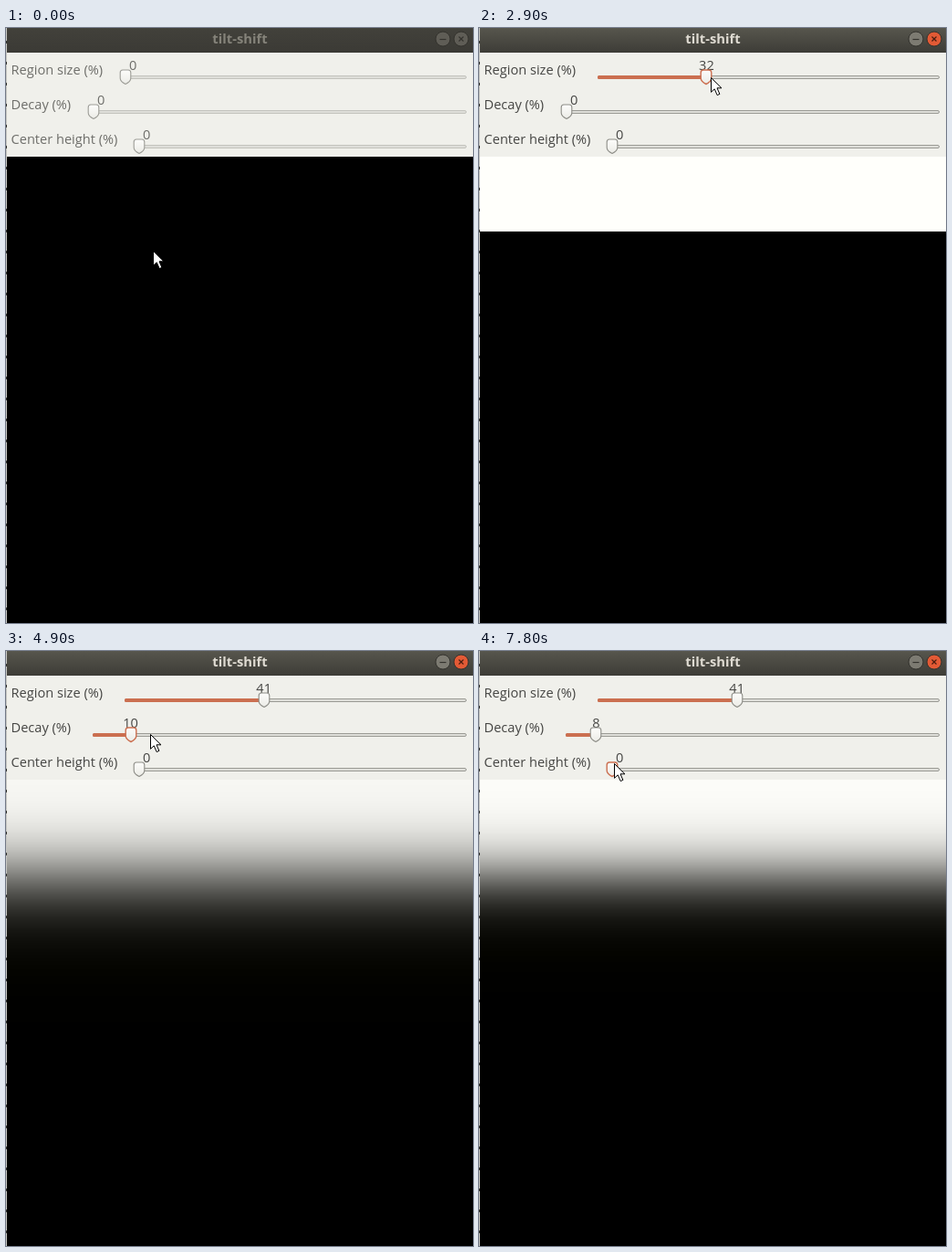
Recreate the animation shown at these times as an HTML page. Size 512 by 652 pixels, loop 8000 ms.

```html
<!DOCTYPE html>
<html lang="en">
<head>
<meta charset="utf-8">
<title>tilt-shift</title>
<style>
  html, body { margin: 0; width: 100%; height: 100%; overflow: hidden; background: #000; }
  svg { display: block; }
  text { font: 14.6px "Open Sans", "Noto Sans", sans-serif; }
  .title { font-weight: 700; font-size: 14.8px; text-anchor: middle; }
  .value { text-anchor: middle; }
</style>
</head>
<body>
<svg id="stage" width="512" height="652" viewBox="0 0 512 652">
  <defs>
    <linearGradient id="bar" x2="0" y2="1">
      <stop offset="0" stop-color="#57564d"/>
      <stop offset="1" stop-color="#3d3c37"/>
    </linearGradient>
    <linearGradient id="barIdle" x2="0" y2="1">
      <stop offset="0" stop-color="#42413b"/>
      <stop offset="1" stop-color="#3b3a35"/>
    </linearGradient>
    <linearGradient id="knob" x2="0" y2="1">
      <stop offset="0" stop-color="#fdfdfb"/>
      <stop offset="1" stop-color="#ebebe6"/>
    </linearGradient>
  </defs>
</svg>
<script>
const LOOP = 8000, STEP = 100;
const IMAGE_TOP = 141, IMAGE_SIZE = 512, TRACK_END = 501;
const FOCUS_TIME = 1700;
const ORANGE = '#cb6f50';

// Each key is [time, ...values]; values run linearly between keys.
const cursorKeys = [
  [0, 161, 244], [500, 161, 244], [700, 154, 146], [800, 154, 146],
  [1100, 138, 91], [1400, 131, 54], [2000, 131, 54], [2300, 177, 54],
  [2900, 254, 54], [3200, 283, 54], [3500, 283, 54], [3900, 104, 87],
  [4000, 104, 87], [4100, 102, 86], [4200, 98, 89], [4600, 98, 89],
  [4700, 115, 90], [4900, 158, 91], [5100, 196, 91], [5200, 197, 91],
  [5400, 197, 91], [6300, 152, 91], [6400, 141, 91], [6500, 141, 91],
  [6700, 130, 91], [6800, 130, 91], [7000, 136, 91], [7300, 136, 91],
  [7600, 148, 123]
];
const regionKeys = [[2000, 0], [2300, 11], [2900, 32], [3200, 41]];
const decayKeys = [
  [4600, 0], [4700, 1], [4800, 5], [4900, 10], [5100, 22], [5200, 25],
  [5400, 25], [6300, 12], [6400, 11], [6500, 11], [6700, 8]
];

const svg = document.getElementById('stage');

function add(tag, attrs, parent = svg, text) {
  const el = document.createElementNS('http://www.w3.org/2000/svg', tag);
  set(el, attrs);
  if (text !== undefined) el.textContent = text;
  parent.appendChild(el);
  return el;
}

function set(el, attrs) {
  for (const name in attrs) el.setAttribute(name, attrs[name]);
}

function sample(keys, t) {
  const next = keys.findIndex(k => k[0] > t);
  if (next === 0) return keys[0].slice(1);
  if (next < 0) return keys[keys.length - 1].slice(1);
  const a = keys[next - 1], b = keys[next];
  const p = (t - a[0]) / (b[0] - a[0]);
  return a.slice(1).map((v, i) => v + (b[i + 1] - v) * p);
}

// Window frame
add('rect', { width: 512, height: 652, fill: '#000' });
add('rect', { width: 1, height: 652, fill: '#c6c6c2' });
for (let y = 14; y < 652; y += 23) add('rect', { y, width: 1, height: 3, fill: '#33332f' });
const titleBar = add('rect', { x: 1, width: 511, height: 27 });
add('rect', { x: 1, y: 27, width: 511, height: 114, fill: '#f0f0eb' });
const title = add('text', { class: 'title', x: 256.5, y: 17 }, svg, 'tilt-shift');

function makeButton(x, mark) {
  return {
    disc: add('circle', { cx: x, cy: 12, r: 8, stroke: '#33322d' }),
    mark: add('path', { d: mark, fill: 'none', 'stroke-width': 1.2 })
  };
}
const minButton = makeButton(479, 'M475.5 12.5h7');
const closeButton = makeButton(499, 'M496.5 9.5l5 5m0-5l-5 5');

// Picture rows
const rowGroup = add('g', { 'shape-rendering': 'crispEdges' });
const rows = Array.from({ length: 652 - IMAGE_TOP }, (_, i) =>
  add('rect', { x: 1, y: IMAGE_TOP + i, width: 511, height: 1 }, rowGroup));

function brightness(y, region, decay) {
  const half = region / 200 * IMAGE_SIZE;
  const d = decay / 100 * IMAGE_SIZE;
  if (!d) return half > 0 && y <= half ? 1 : 0;
  return (Math.tanh((y + half) / d) - Math.tanh((y - half) / d)) / 2;
}

let lastPicture = '';
function drawPicture(region, decay) {
  const key = region + '/' + decay;
  if (key === lastPicture) return;
  lastPicture = key;
  rows.forEach((row, y) => {
    const v = Math.round(255 * brightness(y, region, decay));
    row.setAttribute('fill', `rgb(${v},${v},${Math.max(0, v - 4)})`);
  });
}

// Sliders
function makeSlider(name, start, y) {
  const label = add('text', { x: 5.5, y: y - 2.5 }, svg, name);
  const track = add('rect', {
    x: start - 0.5, y: y - 1, width: 505 - start, height: 3, rx: 1.5, fill: '#deded9'
  });
  const fill = add('rect', { x: start - 1, y: y - 1.5, height: 4, rx: 1.5, fill: ORANGE });
  const value = add('text', { class: 'value', y: y - 7.5 });
  const knob = add('path', {
    d: 'M-3-7.5H3Q5.8-7.5 5.8-4.5V1.5C5.8 4.5 3 6.5 0 8C-3 6.5-5.8 4.5-5.8 1.5V-4.5Q-5.8-7.5-3-7.5Z',
    fill: 'url(#knob)'
  });
  return (amount, active, focused) => {
    const x = start + (TRACK_END - start) * amount / 100;
    const ink = focused ? '#454543' : '#6e6e6a';
    const digits = String(amount);
    label.setAttribute('fill', ink);
    track.setAttribute('stroke', focused ? '#9b9b95' : '#c3c3bd');
    fill.setAttribute('width', amount ? x - start + 1 : 0);
    set(value, { x: Math.max(x, start + 4 + digits.length * 4.2), fill: ink });
    value.textContent = digits;
    set(knob, {
      transform: `translate(${Math.round(x)} ${y})`,
      stroke: active ? ORANGE : focused ? '#8d8d87' : '#9d9d97',
      'stroke-width': active ? 1.4 : 1.1
    });
  };
}
const drawRegion = makeSlider('Region size (%)', 131, 53.5);
const drawDecay = makeSlider('Decay (%)', 96, 91.5);
const drawCenter = makeSlider('Center height (%)', 146, 129.5);

const cursor = add('path', {
  d: 'M.5.5V16.3L4.2 12.8 7.2 19.6 9.9 18.4 7 11.8H12Z',
  fill: '#fff', stroke: '#000', 'stroke-linejoin': 'round'
});

function drawFrame(focused) {
  titleBar.setAttribute('fill', focused ? 'url(#bar)' : 'url(#barIdle)');
  title.setAttribute('fill', focused ? '#dfdbd2' : '#85837a');
  minButton.disc.setAttribute('fill', focused ? '#7d7b72' : '#5f5d56');
  closeButton.disc.setAttribute('fill', focused ? '#e35a35' : '#5f5d56');
  minButton.mark.setAttribute('stroke', '#34332e');
  closeButton.mark.setAttribute('stroke', focused ? '#4a1d10' : '#34332e');
}

function render(time) {
  const t = Math.floor(time % LOOP / STEP) * STEP;
  const focused = t >= FOCUS_TIME;
  const region = Math.round(sample(regionKeys, t)[0]);
  const decay = Math.round(sample(decayKeys, t)[0]);
  const [x, y] = sample(cursorKeys, t).map(Math.round);
  drawFrame(focused);
  drawPicture(region, decay);
  drawRegion(region, focused && t < 4400, focused);
  drawDecay(decay, t >= 4400 && t < 7800, focused);
  drawCenter(0, t >= 7800, focused);
  cursor.setAttribute('transform', `translate(${x} ${y})`);
}

let origin;
function tick(now) {
  if (origin === undefined) origin = now;
  render(now - origin);
  requestAnimationFrame(tick);
}
render(0);
requestAnimationFrame(tick);
</script>
</body>
</html>
```
